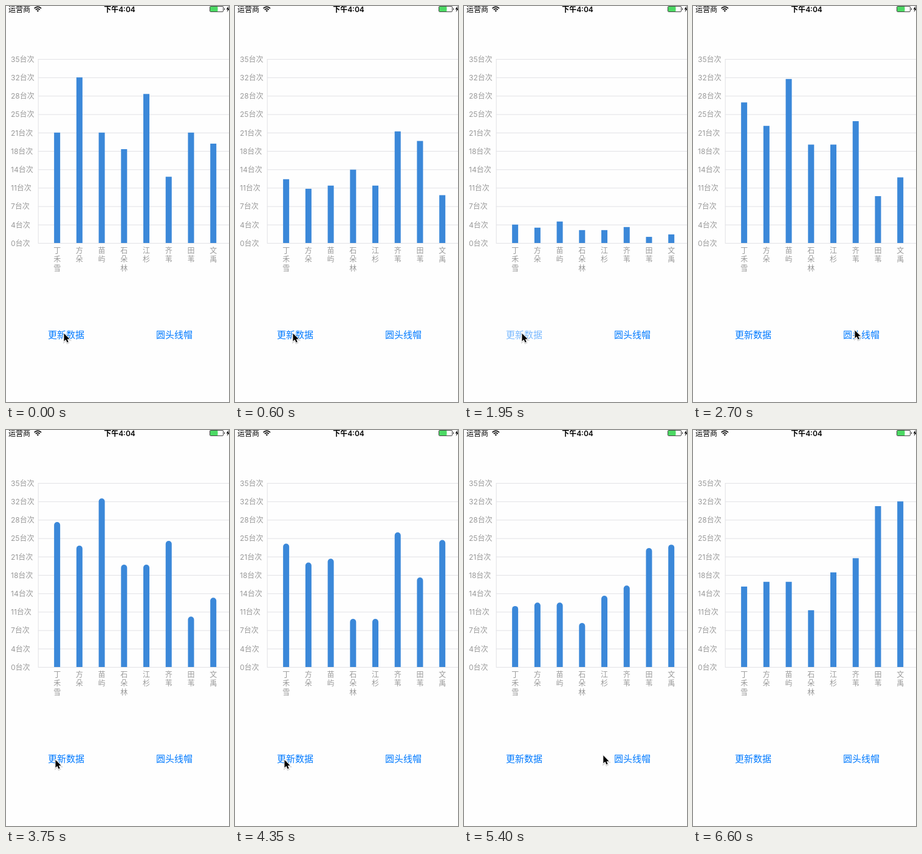
These frames come from a looping animation (367 by 650 pixels, 8.07 s). An HTML page:

```html
<!DOCTYPE html>
<html lang="zh">
<head>
<meta charset="utf-8">
<style>
html, body { margin: 0; width: 100%; height: 100%; overflow: hidden; background: #fefefe; }
svg { display: block; width: 367px; height: 650px; font: 12px Inter, 'Noto Sans CJK SC', 'Noto Sans CJK', sans-serif; }
.axis { fill: #999; }
.mid { text-anchor: middle; }
.button { font-size: 15px; fill: #007aff; text-anchor: middle; }
</style>
</head>
<body>
<svg viewBox="0 0 367 650">
  <defs>
    <clipPath id="plot"><rect y="80" width="367" height="309"/></clipPath>
    <path id="arrow" d="M0 0V14.5L3.4 11.4L5.8 16.7L8.2 15.6L5.9 10.6H10.5Z"/>
  </defs>

  <text x="4" y="10">运营商</text>
  <path d="M46.6 3.9Q52.3 -1 58 3.9M48.8 6.2Q52.3 3.2 55.8 6.2" fill="none" stroke="#000" stroke-width="1.7"/>
  <path d="M52.3 9.6L50.4 7.7Q52.3 6.2 54.2 7.7Z"/>
  <text class="mid" x="187" y="10" font-weight="600">下午4:04</text>
  <rect x="335.5" y=".5" width="22" height="9" rx="1.5" fill="none" stroke="#444"/>
  <rect x="336" y="1" width="12.5" height="8" rx="1" fill="#4cd964"/>
  <path d="M359 3.2Q361.4 5 359 6.8ZM366.5 0L362.5 5.6H365L363.6 10L368 4.3H365.6Z"/>

  <g id="grid" fill="#e2e2e5"></g>
  <g id="labels" class="axis"></g>
  <g id="bars" fill="#3b88d9" clip-path="url(#plot)"></g>

  <text id="update" class="button" x="99" y="545">更新数据</text>
  <text id="toggle" class="button" x="277" y="545">圆头线帽</text>

  <g id="cursor">
    <use href="#arrow" transform="translate(.5 1.5) scale(.9)" stroke="#000" stroke-width="3" opacity=".16"/>
    <use href="#arrow" transform="translate(.5 .5) scale(.88)" stroke="#fff" stroke-width="2" paint-order="stroke"/>
  </g>
</svg>
<script>
const LOOP = 8070, STEP = 150;
const GROW = 1000, FADE = 300, REST = 130, GLIDE = 600;
const TOP = 87, ROW = 30.2, BASE = TOP + 10 * ROW, FULL = 9 * ROW;
const LEFT = 52.7, BAR = 10, GAP = 36.72;

const names = ['丁禾雪', '方朵', '苗屿', '石朵林', '江杉', '齐苇', '田苇', '文禹'];
const start = [95, 537], update = [81, 541], toggle = [266, 532], exit = [238, 680];

// A tap with values loads new bars, one without switches the line cap
const taps = [
  { at: -GROW, spot: start, values: [20, 30, 20, 17, 27, 12, 20, 18] },
  { at: 206, spot: start, values: [20, 17, 18, 23, 18, 35, 32, 15] },
  { at: 1829, spot: start, values: [30, 25, 35, 21, 21, 26, 10, 14] },
  { at: 2890, spot: toggle },
  { at: 3858, spot: update, values: [32, 27, 28, 12, 12, 35, 23, 33] },
  { at: 4972, spot: update, values: [17, 18, 18, 12, 20, 23, 34, 35] },
  { at: 5960, spot: toggle },
  { at: LOOP, spot: exit }
];

const $ = id => document.getElementById(id);

function set(el, attrs) {
  for (const key in attrs) el.setAttribute(key, attrs[key]);
  return el;
}

function add(parent, tag, attrs, text = '') {
  const el = set(document.createElementNS('http://www.w3.org/2000/svg', tag), attrs);
  el.textContent = text;
  return $(parent).appendChild(el);
}

add('grid', 'rect', { x: LEFT, y: TOP, width: 1, height: BASE - TOP });
for (let i = 0; i <= 10; i++) {
  const y = TOP + ROW * i;
  add('grid', 'rect', { x: LEFT, y, width: 367 - LEFT, height: 1 });
  add('labels', 'text', { x: 8, y: y + 4.8 }, Math.round(35 - 3.5 * i) + '台次');
}

const bars = names.map((name, i) => {
  const x = LEFT + GAP * (i + 0.72);
  [...name].forEach((char, row) =>
    add('labels', 'text', { class: 'mid', x: x + BAR / 2, y: 405.7 + 14.5 * row }, char));
  return add('bars', 'rect', { x, width: BAR });
});

// Cubic bezier (.25, .1, .25, 1)
function ease(x) {
  if (x <= 0 || x >= 1) return x <= 0 ? 0 : 1;
  let lo = 0, hi = 1, s;
  for (let i = 0; i < 24; i++) {
    s = (lo + hi) / 2;
    if (0.75 * s * (1 - s) + s ** 3 < x) lo = s; else hi = s;
  }
  return 0.3 * s * (1 - s) ** 2 + 3 * s * s * (1 - s) + s ** 3;
}

function fade(id, age) {
  set($(id), { opacity: Math.min(1, 0.2 + 0.8 * age / FADE) });
}

function draw(t) {
  const past = taps.filter(tap => tap.at <= t);
  const load = past.filter(tap => tap.values).pop();
  const switches = past.filter(tap => !tap.values);

  const cap = switches.length % 2 ? BAR / 2 : 0;
  const scale = FULL * ease((t - load.at) / GROW) / Math.max(...load.values);
  bars.forEach((bar, i) => {
    const height = load.values[i] * scale + cap;
    set(bar, { y: BASE - height, height: height + 2 * cap, rx: cap });
  });

  fade('update', t - load.at);
  fade('toggle', switches.length ? t - switches.pop().at : FADE);

  // After each tap the pointer glides to the spot of the next one
  const from = past[past.length - 1], to = taps[past.length];
  const u = ease((t - from.at - REST) / GLIDE);
  const [x, y] = from.spot.map((a, i) => a + (to.spot[i] - a) * u);
  set($('cursor'), { transform: `translate(${x} ${y})` });
}

const begin = performance.now();
function tick() {
  const t = (performance.now() - begin) % LOOP;
  draw(Math.floor(t / STEP) * STEP);
  requestAnimationFrame(tick);
}
tick();
</script>
</body>
</html>
```
